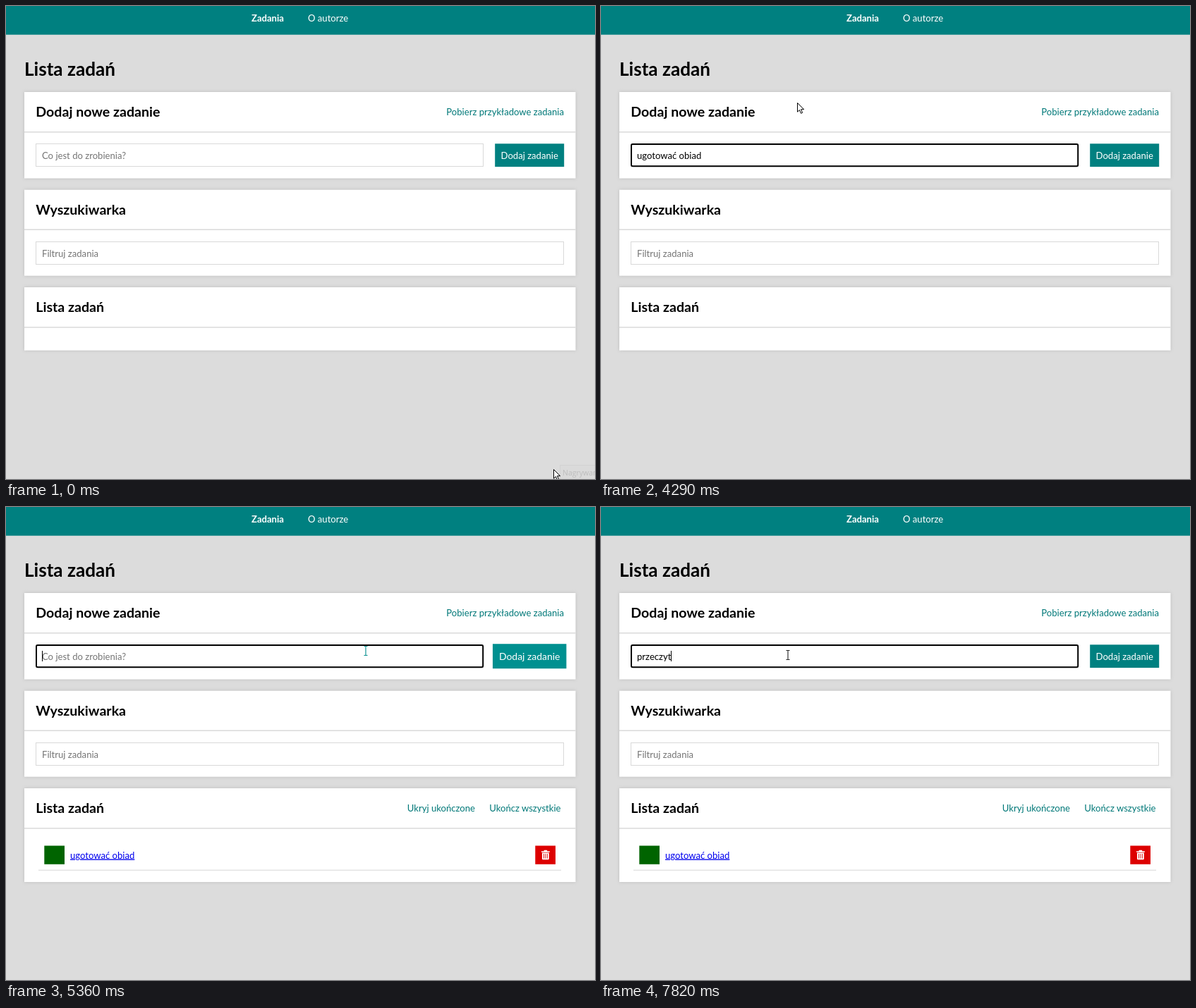
An HTML page for the animation above (8000 ms loop, 835 by 671 pixels).

```html
<!DOCTYPE html>
<html lang="pl">
<head>
<meta charset="utf-8">
<title>Lista zadań</title>
<style>
  html, body { margin: 0; width: 100%; height: 100%; overflow: hidden; background: #dcdcdc; }
  svg { display: block; width: 100vw; height: 100vh; }
  text { font: 13.1px Lato, sans-serif; white-space: pre; }
  .h1 { font-size: 26.1px; font-weight: 700; }
  .h2 { font-size: 19.6px; font-weight: 700; }
  .nav { fill: #fff; }
  .link { fill: #007878; }
  .hint { fill: #757575; }
  .end { text-anchor: end; }
  .mid { text-anchor: middle; }
  .panel { fill: #fff; filter: drop-shadow(0 0 2px #bbb); }
  .rule { fill: #dcdcdc; }
  .field { fill: #fff; stroke: #d9d9d9; }
  .cursor { fill: #fff; stroke: #000; stroke-linejoin: round; }
</style>
</head>
<body>
<svg viewBox="0 0 835 671" xmlns="http://www.w3.org/2000/svg">
  <rect width="835" height="671" fill="#dcdcdc"/>
  <rect width="835" height="40.7" fill="teal"/>
  <text class="nav" x="348" y="22" font-weight="700" style="font-weight:700">Zadania</text>
  <text class="nav" x="428" y="22">O autorze</text>
  <text class="h1" x="26" y="99">Lista zadań</text>

  <rect class="panel" x="26" y="122" width="781.5" height="122.5"/>
  <rect class="rule" x="26" y="178" width="781.5" height="1.6"/>
  <text class="h2" x="42.3" y="157">Dodaj nowe zadanie</text>
  <text class="link end" x="791" y="155">Pobierz przykładowe zadania</text>
  <rect class="field" id="field" x="42.5" y="195.5" width="634" height="32"/>
  <rect id="focus" x="43" y="196" width="633.2" height="31.2" rx="2" fill="#fff" stroke="#000" stroke-width="2"/>
  <text class="hint" id="hint" x="51" y="217">Co jest do zrobienia?</text>
  <text id="typed" x="51" y="217"></text>
  <rect id="caret" y="204" width="1" height="15"/>
  <g id="button">
    <rect id="face" x="693.2" y="195.3" width="98" height="32.8" fill="teal"/>
    <text class="nav mid" x="742.2" y="217">Dodaj zadanie</text>
  </g>

  <rect class="panel" x="26" y="260.7" width="781.5" height="122"/>
  <rect class="rule" x="26" y="316.4" width="781.5" height="1.6"/>
  <text class="h2" x="42.3" y="295.5">Wyszukiwarka</text>
  <rect class="field" x="42.5" y="334.5" width="748" height="32"/>
  <text class="hint" x="51" y="355.5">Filtruj zadania</text>

  <rect class="panel" id="list" x="26" y="399" width="781.5" height="89.6"/>
  <rect class="rule" x="26" y="455" width="781.5" height="1.6"/>
  <text class="h2" x="42.3" y="434">Lista zadań</text>
  <g id="task">
    <text class="link end" x="665" y="432">Ukryj ukończone</text>
    <text class="link end" x="786.5" y="432">Ukończ wszystkie</text>
    <rect x="54.3" y="480.5" width="28.7" height="26.3" fill="#006400"/>
    <text x="91" y="498.5" fill="#0000ee" text-decoration="underline">ugotować obiad</text>
    <rect x="750.3" y="480.5" width="28.7" height="26.3" fill="#d00"/>
    <path d="M759 488.2h3.2l.8-1.4h3.8l.8 1.4h3.2v1.5h-11.8zM760 490.5h9.8v8.6q0 1.2-1.2 1.2h-7.4q-1.2 0-1.2-1.2z" fill="#fff"/>
    <path d="M762.4 492v6.6M764.9 492v6.6M767.4 492v6.6" stroke="#d00" stroke-width=".9"/>
    <rect class="rule" x="46" y="514.6" width="741" height="1.2"/>
  </g>

  <g id="tip">
    <rect x="785.5" y="651.5" width="60" height="30" fill="#dadada" stroke="#d2d2d2"/>
    <text x="789" y="666" fill="#bdbdbd" style="font:10.5px 'Open Sans', sans-serif">Nagrywanie</text>
  </g>

  <path class="cursor" id="arrow" d="M.5 .5V13.2L3.4 10.5 5.5 15.3 7.6 14.4 5.5 9.7H9.6Z"/>
  <path class="cursor" id="hand" d="M-1.3 10V1Q-1.3-.4 0-.4 1.4-.4 1.4 1V6.2Q1.6 5 2.9 5.2 3.9 5.4 4 6.4 5 5.6 6.3 6.7 7.8 6.2 8.2 7.8V12.2Q8.2 14 6.9 15.6V18H-.3V16.2L-4.6 11Q-5.2 9.4-3.8 8.9-2.8 8.7-1.3 10.6ZM1.4 6V9.4M4 6.6V9.4M6.3 7V9.6"/>
  <path id="beam" d="M-2.5-6.5H-.6L0-6 .6-6.5H2.5M0-6V6M-2.5 6.5H-.6L0 6 .6 6.5H2.5" fill="none" stroke-width="1.1"/>
</svg>
<script>
const LOOP = 8000, TICK = 66.7, ANCHOR = 4290;
const $ = id => document.getElementById(id);
const el = Object.fromEntries(
  ['field', 'focus', 'hint', 'typed', 'caret', 'button', 'face', 'list', 'task', 'tip', 'arrow', 'hand', 'beam']
    .map(id => [id, $(id)]));

// time, x, y, pointer shape from then on
const path = [
  [0, 776, 657, 'arrow'], [21, 770, 650, 'arrow'], [155, 640, 530, 'arrow'],
  [290, 400, 355, 'beam'], [350, 310, 300, 'arrow'], [460, 190, 235, 'arrow'],
  [490, 165, 222, 'beam'], [555, 141, 217, 'beam'], [755, 141, 217, 'beam'],
  [955, 195, 211, 'beam'], [1020, 214, 185, 'arrow'], [1155, 232, 130, 'arrow'],
  [4223, 232, 130, 'arrow'], [4289, 277, 137, 'arrow'], [4490, 450, 165, 'arrow'],
  [4620, 590, 200, 'beam'], [4755, 694, 216, 'hand'], [4957, 699, 217, 'hand'],
  [5090, 699, 216, 'hand'], [5155, 690, 214, 'beam'], [5357, 510, 204, 'beam'],
  [5424, 461, 197, 'beam'], [5490, 407, 190, 'beam'], [5557, 352, 196, 'beam'],
  [5690, 300, 205, 'beam'], [5957, 268, 209, 'beam'], [6024, 265, 210, 'beam']
];

const words = [
  { text: 'ugotować obiad', until: 5030,
    keys: [1970, 2100, 2240, 2370, 2500, 2570, 2770, 2970, 3090, 3210, 3330, 3440, 3560, 3760] },
  { text: 'przeczyt', until: LOOP,
    keys: [6760, 6890, 7090, 7290, 7490, 7600, 7690, 7820] }
];

const caretOn = [[970, 1500], [1970, 4290], [5030, 5500], [6030, 6560], [6760, LOOP]];
const focusOn = [[970, 4890], [5030, LOOP]];

const within = (spans, t) => spans.some(([a, b]) => t >= a && t < b);
const show = (node, on) => { node.style.display = on ? '' : 'none'; };
const ramp = (t, from, length) => {
  const p = Math.min(1, Math.max(0, (t - from) / length));
  return 1 - (1 - p) ** 2;
};

function pointer(t) {
  const time = t < 40 ? 0 : Math.max(21, ANCHOR + Math.floor((t - ANCHOR) / TICK) * TICK);
  let i = path.length - 1;
  while (i > 0 && path[i][0] > time) i--;
  const a = path[i], b = path[i + 1] || a;
  const p = b === a ? 0 : (time - a[0]) / (b[0] - a[0]);
  return { x: Math.round(a[1] + (b[1] - a[1]) * p), y: Math.round(a[2] + (b[2] - a[2]) * p), shape: a[3] };
}

function draw(t) {
  const word = words.find(w => t < w.until);
  const text = word.text.slice(0, word.keys.filter(k => k <= t).length);
  if (el.typed.textContent !== text) el.typed.textContent = text;
  show(el.hint, !text);
  show(el.focus, within(focusOn, t));
  show(el.caret, within(caretOn, t));
  el.caret.setAttribute('x', 51 + Math.round(text ? el.typed.getComputedTextLength() : 0));

  const hover = ramp(t, 4790, 300) - ramp(t, 5400, 300);
  const size = 1 + 0.066 * hover, shade = Math.round(128 + 16 * hover);
  el.button.setAttribute('transform', `translate(742.2 211.7) scale(${size}) translate(-742.2 -211.7)`);
  el.face.setAttribute('fill', `rgb(0,${shade},${shade})`);

  const added = t >= 5030;
  show(el.task, added);
  el.list.setAttribute('height', added ? 133 : 89.6);
  show(el.tip, t < 110);

  const at = pointer(t);
  for (const name of ['arrow', 'hand', 'beam']) show(el[name], name === at.shape);
  el[at.shape].setAttribute('transform', `translate(${at.x} ${at.y})`);
  el.beam.setAttribute('stroke', t > 5100 && t < 5960 ? '#008c8c' : '#222');
}

const start = performance.now();
function frame(now) {
  draw(Math.max(0, now - start) % LOOP);
  requestAnimationFrame(frame);
}
draw(0);
requestAnimationFrame(frame);
</script>
</body>
</html>
```
